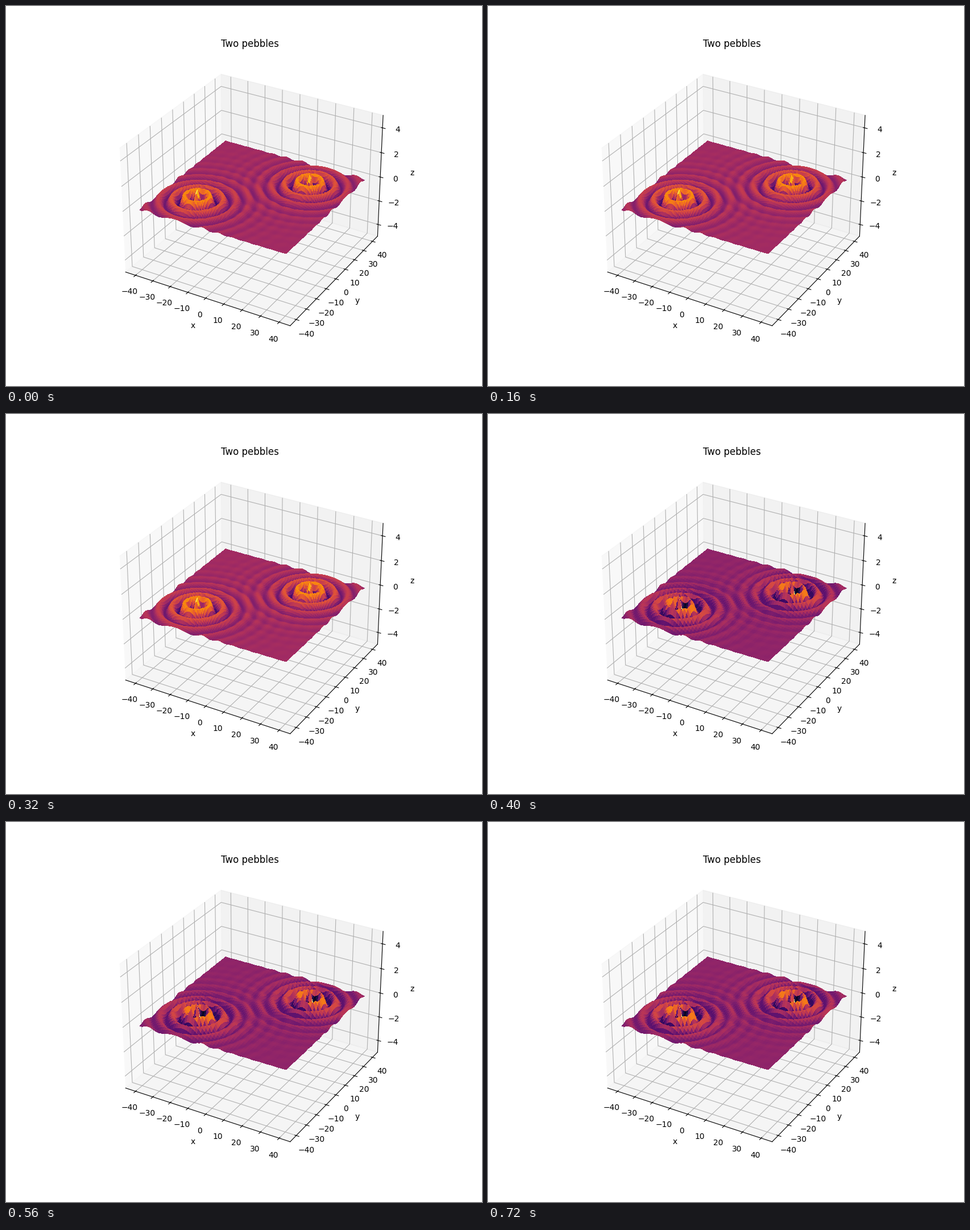
A matplotlib script that plays this animation: 837 by 669 pixels, repeating every 800 ms.

```python
import numpy as np
import matplotlib.pyplot as plt
from matplotlib.animation import FuncAnimation

FRAMES, INTERVAL = 10, 80
SWITCH = 5          # frame at which the mesh turns coarse
HALF = 40           # half width of the pond
DROPS = [(-20, -20), (20, 20)]
DPI = 100
WIDTH, HEIGHT = 837, 669


def water(x, y):
    """Height of two damped circular waves."""
    z = np.zeros_like(x)
    for px, py in DROPS:
        r = np.hypot(x - px, y - py)
        z += np.cos(r) * np.exp(-0.09 * r)
    return z


def add_surface(ax, count, clim, by_corner=False):
    side = np.linspace(-HALF, HALF, count)
    x, y = np.meshgrid(side, side)
    z = water(x, y)
    surf = ax.plot_surface(x, y, z, rcount=count, ccount=count,
                           cmap="inferno", linewidth=0, antialiased=False)
    if by_corner:
        surf.set_array(z[:-1, :-1].ravel())
    surf.set_clim(*clim)
    return surf


# The small surplus keeps the pixel size from being rounded down.
fig = plt.figure(figsize=((WIDTH + 0.01) / DPI, (HEIGHT + 0.01) / DPI), dpi=DPI)
ax = fig.add_subplot(projection="3d")
fine = add_surface(ax, 100, (-0.73, 0.95))
coarse = add_surface(ax, 65, (-0.70, 1.09), by_corner=True)
ax.set_zlim(-5, 5)
ax.set(xlabel="x", ylabel="y", zlabel="z", title="Two pebbles")


def update(frame):
    fine.set_visible(frame < SWITCH)
    coarse.set_visible(frame >= SWITCH)
    return fine, coarse


anim = FuncAnimation(fig, update, frames=FRAMES, interval=INTERVAL,
                     init_func=lambda: update(0), repeat=True,
                     repeat_delay=0, blit=False)
plt.show()
```
